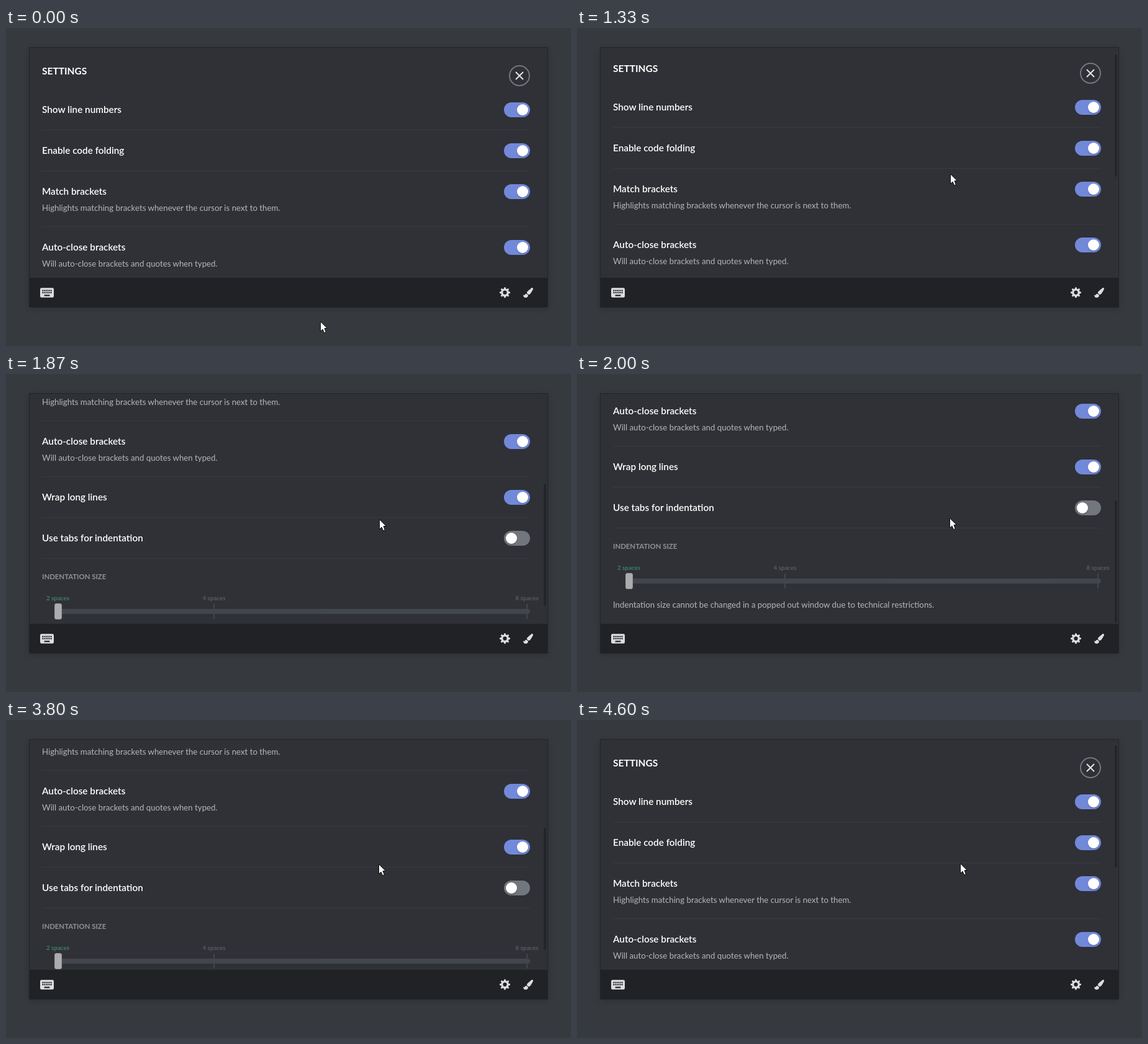
Animation, 910 px wide and 513 px high, one loop 5.21 s. Source, as an HTML page:

```html
<!DOCTYPE html>
<html lang="en">
<head>
<meta charset="utf-8">
<title>Settings</title>
<style>
  html, body { margin: 0; width: 100%; height: 100%; overflow: hidden; background: #36393e; }
  .panel {
    position: absolute; left: 38px; top: 32px; width: 834px; height: 418px; background: #2f3136;
    box-shadow: 0 0 0 1px rgba(32, 34, 37, .85), 0 2px 10px rgba(0, 0, 0, .2);
  }
  svg { position: absolute; left: 0; top: 0; display: block; }
  text { font-family: Lato, "Open Sans", sans-serif; }
  .heading { font-size: 15.5px; font-weight: 700; fill: #fff; }
  .title { font-size: 15.3px; font-weight: 600; fill: #fff; }
  .note { font-size: 13.25px; fill: #b3b6ba; }
  .label { font-size: 11.4px; font-weight: 700; fill: #8e9297; }
  .mark { font-size: 9.8px; font-weight: 700; fill: #72767d; text-anchor: middle; }
  .mark.current { fill: #43b581; }
  .line { fill: rgba(79, 84, 92, .3); }
  .knob { fill: #fff; filter: drop-shadow(0 2px 1px rgba(0, 0, 0, .15)); }
  .icon { fill: #dcddde; }
</style>
</head>
<body>
<div class="panel"></div>
<svg width="910" height="513" viewBox="0 0 910 513">
  <clipPath id="view"><rect x="38" y="40" width="834" height="363"/></clipPath>
  <g clip-path="url(#view)">
    <g id="content">
      <text class="heading" x="58" y="75">SETTINGS</text>
      <g fill="none" stroke-width="2">
        <circle cx="827" cy="77" r="16" stroke="#72767d"/>
        <path d="M821 71l12 12m0-12l-12 12" stroke="#e6e6e7"/>
      </g>
      <g id="rows"></g>
      <text class="label" x="58" y="576">INDENTATION SIZE</text>
      <g id="slider" opacity=".6">
        <rect x="80" y="624" width="764" height="8" rx="4" fill="#4f545c"/>
      </g>
      <text class="note" x="58" y="671">Indentation size cannot be changed in a popped out window due to technical restrictions.</text>
    </g>
  </g>
  <rect id="thumb" x="866" width="4" height="197" rx="2" fill="#232529"/>

  <rect x="38" y="403" width="834" height="47" fill="#202225"/>
  <g transform="translate(52.8 413.8) scale(1.1)">
    <rect class="icon" x="2" y="5" width="20" height="14" rx="2"/>
    <g stroke="#202225" stroke-width="2">
      <path d="M5 9h14M5 12h14" stroke-dasharray="2 1"/>
      <path d="M8 16h8"/>
    </g>
  </g>
  <g transform="translate(803.5 426.7)">
    <g id="teeth" class="icon"></g>
    <circle r="4.7" fill="none" stroke="#dcddde" stroke-width="3.2"/>
  </g>
  <path class="icon" transform="translate(833 419)"
    d="M5.2 9.7C4 9.8 2.8 10.2 2.2 11.9 1.8 12.7 1 12.1 0 11.2 0 13.7 1.2 16 4 16 6.4 16 8 14.6 8 12ZM14.3 0C13.8 0 13.4.2 13.1.5 6.7 6.2 6 6.4 6 8 6 8.5 6.1 8.9 6.3 9.2L8.3 10.9C8.5 11 8.7 11 9 11 10.9 11 12 9.6 15.6 3 15.8 2.5 16 2 16 1.6 16 .6 15.2 0 14.3 0Z"/>
  <path id="cursor" d="M.5 .7V16.3L4 13 6.5 18.5H8.5L9 17 7 11.5H11.3Z" fill="#fff" stroke="#000" stroke-width=".9"/>
</svg>
<script>
const LOOP = 5210;
const FRAMES_PER_MS = 0.03;
const $ = id => document.getElementById(id);

const rows = [
  [132, 'Show line numbers'],
  [198, 'Enable code folding'],
  [264, 'Match brackets', 'Highlights matching brackets whenever the cursor is next to them.'],
  [354, 'Auto-close brackets', 'Will auto-close brackets and quotes when typed.'],
  [444, 'Wrap long lines'],
  [510, 'Use tabs for indentation', '', false],
];

$('rows').innerHTML = rows.map(([y, title, note = '', on = true]) => `
  <text class="title" x="58" y="${y + 5}">${title}</text>
  <text class="note" x="58" y="${y + 31}">${note}</text>
  <rect x="802" y="${y - 12}" width="42" height="24" rx="12" fill="${on ? '#7289da' : '#72767d'}"/>
  <circle class="knob" cx="${on ? 832 : 814}" cy="${y}" r="9"/>
  <rect class="line" x="58" y="${y + (note ? 56 : 32)}" width="786" height="1"/>`).join('');

$('slider').innerHTML += [[83.5, 2], [335, 4], [839, 8]].map(([x, size]) => `
  <text class="mark ${size === 2 ? 'current' : ''}" x="${x}" y="610">${size} spaces</text>
  <rect x="${x - 1}" y="616" width="2" height="24" fill="#4f545c"/>`).join('') +
  '<rect x="78.5" y="615.5" width="11" height="25" rx="2.5" fill="#fff" stroke="#dcddde"/>';

$('teeth').innerHTML = Array.from({ length: 8 }, (_, i) =>
  `<path d="M-2 -5.5L-1 -8.5H1L2 -5.5Z" transform="rotate(${i * 45})"/>`).join('');

// Each scroll: start ms, end ms, distance, x of the second bezier handle.
const scrolls = [
  [1307, 1567, 200, .58],
  [1740, 2000, 94, .58],
  [3677, 4070, -294, .6625],
];

// Cursor path: ms, x, y.
const path = [
  [0, 506, 473], [100, 496, 455], [200, 487, 415], [270, 488, 385], [370, 502, 335],
  [470, 520, 298], [533, 532, 279], [670, 563, 255], [800, 590, 240], [930, 601, 233],
  [1030, 601, 235], [1740, 601, 235], [2000, 600, 232], [4437, 600, 232], [4600, 617, 231],
];

// cubic-bezier(.42, 0, x2, 1)
function ease(p, x2) {
  if (p <= 0 || p >= 1) return p <= 0 ? 0 : 1;
  let low = 0, high = 1;
  for (let i = 0; i < 24; i++) {
    const u = (low + high) / 2, v = 1 - u;
    if (1.26 * u * v * v + 3 * x2 * u * u * v + u ** 3 < p) low = u; else high = u;
  }
  return low * low * (3 - 2 * low);
}

function scrollAt(t) {
  return Math.round(scrolls.reduce((sum, [start, end, distance, x2]) =>
    sum + distance * ease((t - start) / (end - start), x2), 0));
}

function cursorAt(t) {
  const next = path.findIndex(([time]) => time > t);
  if (next < 0) return path[path.length - 1].slice(1);
  const [a, b] = [path[next - 1], path[next]];
  const p = (t - a[0]) / (b[0] - a[0]);
  return [1, 2].map(i => Math.round(a[i] + (b[i] - a[i]) * p));
}

function draw(now) {
  const t = Math.floor((now % LOOP + 3.5) * FRAMES_PER_MS) / FRAMES_PER_MS;
  const scroll = scrollAt(t);
  const [x, y] = cursorAt(t);
  $('content').setAttribute('transform', `translate(0 ${-scroll})`);
  $('thumb').setAttribute('y', Math.round(41 + scroll * .555));
  $('thumb').setAttribute('visibility', y < 450 ? 'visible' : 'hidden');
  $('cursor').setAttribute('transform', `translate(${x} ${y})`);
}

const begin = performance.now();
function tick() {
  draw(performance.now() - begin);
  requestAnimationFrame(tick);
}
tick();
</script>
</body>
</html>
```
